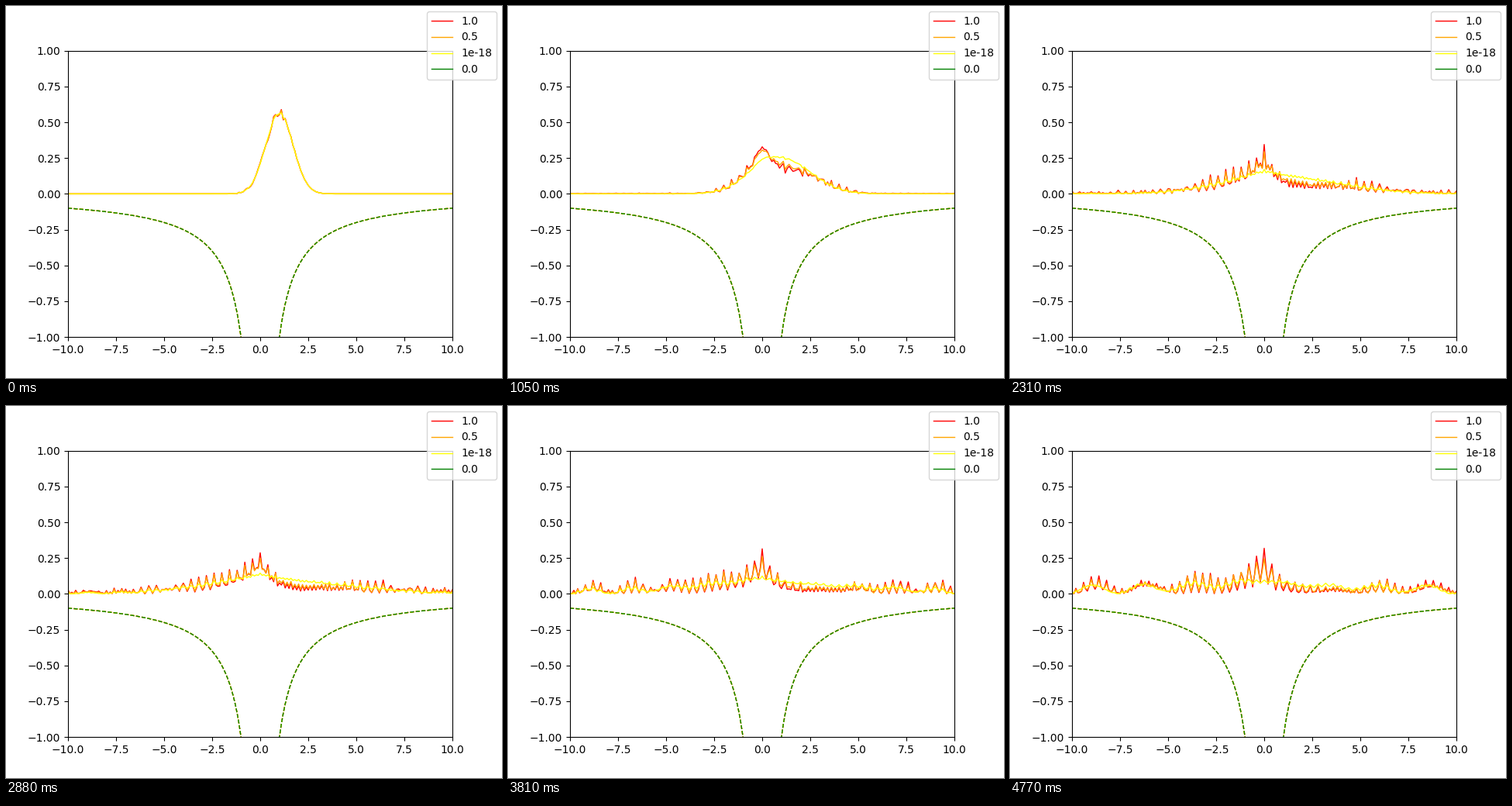
Recreate the animation shown at these times as a matplotlib script. Size 640 px wide and 480 px high, loop 4800 ms.

```python
import numpy as np
import matplotlib.pyplot as plt
from matplotlib.animation import FuncAnimation

FRAMES, INTERVAL = 160, 30
HALF, N = 10.0, 200
DT = 0.051
DX = 2 * HALF / N

x = np.linspace(-HALF, HALF, N + 1)
k = 2 * np.pi * np.fft.fftfreq(N, DX)
kinetic = np.exp(-0.5j * k**2 * DT)

# label, colour, strength of the attraction at the origin
CASES = [
    ("1.0", "red", 0.42),
    ("0.5", "orange", 0.34),
    ("1e-18", "yellow", 0.105),
    ("0.0", "green", None),
]


def evolve(strength):
    """Split-step evolution on a ring; returns the density per frame."""
    psi = np.pi**-0.25 * np.exp(-0.5 * (x[:-1] - 1) ** 2) + 0j
    kick = np.exp(1j * strength / DX * DT)
    rows = []
    for _ in range(FRAMES):
        psi[N // 2] *= kick
        psi = np.fft.ifft(kinetic * np.fft.fft(psi))
        density = np.abs(psi) ** 2
        rows.append(np.append(density, density[0]))
    return rows


fig, ax = plt.subplots(figsize=(6.4, 4.8), dpi=100)
ax.set_xlim(-HALF, HALF)
ax.set_ylim(-1, 1)

distance = np.abs(x)
distance[N // 2] = np.nan
potential = -1 / distance

curves = []
for label, color, strength in CASES:
    line, = ax.plot([], [], color=color, lw=1, label=label)
    ax.plot(x, potential, "--", color=color, lw=1)
    # the unregularised case has no finite solution, so its line stays empty
    if strength is not None:
        curves.append((line, evolve(strength)))

fig.legend()


def draw(i):
    for line, rows in curves:
        line.set_data(x, rows[i])
    return [line for line, _ in curves]


anim = FuncAnimation(fig, draw, frames=FRAMES, interval=INTERVAL,
                     repeat=True, repeat_delay=0)
plt.show()
```
